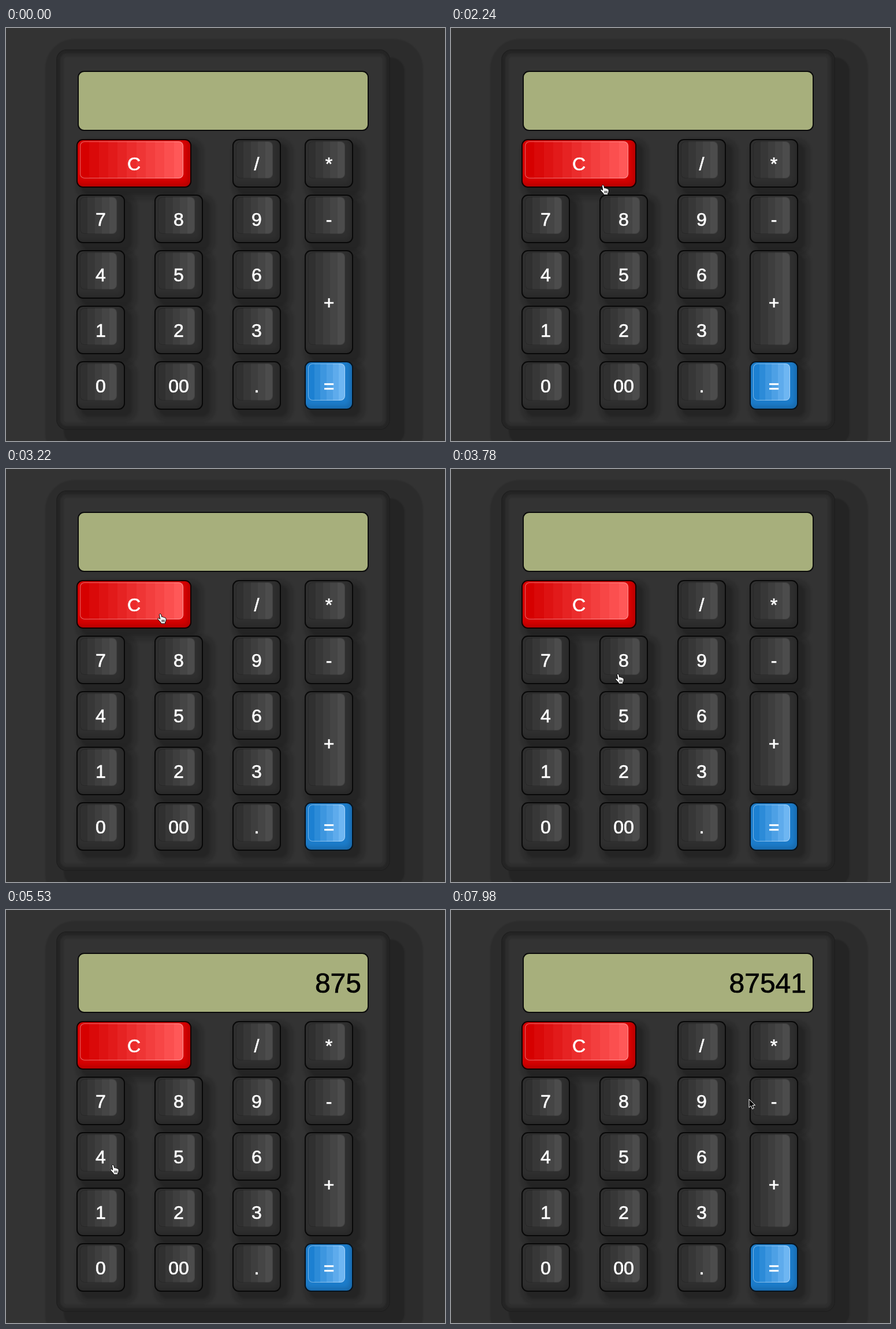
An HTML page for the animation above (8 s loop, 760 by 714 pixels).

```html
<!DOCTYPE html>
<html lang="en">
<head>
<meta charset="utf-8">
<title>Calculator</title>
<style>
  * { box-sizing: border-box; }
  html, body { margin: 0; width: 100%; height: 100%; overflow: hidden; background: #333; }
  #stage {
    position: relative; width: 760px; height: 714px; overflow: hidden;
    font-family: "Liberation Sans", Arial, sans-serif;
  }
  #stage div, svg { position: absolute; }
  #body {
    left: 87px; top: 37px; width: 578px; height: 658px; border-radius: 18px;
    background: #333; border: 2px solid #202020;
    box-shadow:
      19px 20px 2px 6px rgba(0,0,0,.17), 19px 20px 2px 38px rgba(0,0,0,.13),
      inset 0 0 2px 5px rgba(0,0,0,.18), inset 0 0 2px 11px rgba(0,0,0,.1);
  }
  #screen {
    left: 124px; top: 74px; width: 504px; height: 104px; padding-right: 11px;
    border: 2px solid #0b0b0b; border-radius: 11px; background: #a7af7c;
    color: #000; font-size: 48px; line-height: 102px; text-align: right;
    -webkit-text-stroke: .7px #000;
  }
  .key {
    border: 2px solid #080808; border-radius: 11px; background: #2f2f2f;
    box-shadow:
      10px 10px 4px 2px rgba(0,0,0,.18), 10px 10px 4px 12px rgba(0,0,0,.12),
      inset -4px -5px 7px rgba(0,0,0,.14);
  }
  .face {
    left: 4px; top: 2px; right: 12px; bottom: 14px; border-radius: 8px;
    border: 1px solid rgba(0,0,0,.16); background-origin: border-box;
  }
  .label {
    inset: 0; display: flex; align-items: center; justify-content: center;
    padding-top: 2px; color: #fff; font-size: 32px; -webkit-text-stroke: .7px #fff;
  }
  .red { background: #d50000; border-color: #140000; }
  .blue { background: #1c7cca; border-color: #07131e; }
  .red .face, .blue .face { border-color: rgba(255,255,255,.4); }
  svg { left: 0; top: 0; overflow: visible; }
</style>
</head>
<body>
<div id="stage">
  <div id="body"></div>
  <div id="screen"></div>
  <svg id="pointer" width="1" height="1">
    <g id="hand" fill="#fff" stroke="#000" stroke-linejoin="round">
      <path d="M-1.6 .6C-1 -1.1 1.2-.8 1.6 .8L2.8 5C4 4.2 5.2 4.7 5.6 5.6C6.6 5 7.8 5.5 8 6.5C9.2 6.2 10 7 10 8.2C10.2 10.5 10 12 8.7 13.8V16.2H1.5L.8 14.2C-.8 12.5-2.6 10.4-4 8.8C-4.8 7.2-3 6.2-1.4 7.6L-.2 8.6Z"/>
      <path d="M3 9.5V13.5M5 9.5V13.5M7 9.5V13.5"/>
    </g>
    <path id="arrow" d="M0 0V14.5L3.4 11.4L5.7 17L8.3 15.9L6 10.5H10.5Z" fill="#000" stroke="#fff"/>
  </svg>
</div>
<script>
const LOOP = 8000, TICK = 70, TRAVEL = 280, PRESS_DELAY = 210;
const [stage, screenBox, pointer, hand, arrow] =
  ["stage", "screen", "pointer", "hand", "arrow"].map(id => document.getElementById(id));

const tones = {
  dark: { from: [48, 48, 48], to: [76, 76, 76], bands: 5 },
  red: { from: [214, 0, 0], to: [255, 88, 88], bands: 11 },
  blue: { from: [28, 128, 210], to: [110, 182, 242], bands: 6 }
};
const keys = {};
const mix = (a, b, k) => a + (b - a) * k;

function bandedGradient({ from, to, bands }) {
  const stops = Array.from({ length: bands }, (_, i) => {
    const rgb = from.map((v, c) => Math.round(mix(v, to[c], i / (bands - 1))));
    return `rgb(${rgb}) ${100 * i / bands}% ${100 * (i + 1) / bands}%`;
  });
  return `linear-gradient(90deg, ${stops})`;
}

function addDiv(parent, className) {
  const div = document.createElement("div");
  div.className = className;
  return parent.appendChild(div);
}

function addKey(symbol, x, y) {
  const w = symbol === "C" ? 199 : 84;
  const h = symbol === "+" ? 180 : 84;
  const tone = { C: "red", "=": "blue" }[symbol] || "dark";
  const key = addDiv(stage, "key " + tone);
  key.style.cssText = `left:${x}px;top:${y}px;width:${w}px;height:${h}px`;
  addDiv(key, "face").style.background = bandedGradient(tones[tone]) + " border-box";
  addDiv(key, "label").textContent = symbol;
  keys[symbol] = { x, y, w, h };
}

[["C", "", "/", "*"], [7, 8, 9, "-"], [4, 5, 6, "+"], [1, 2, 3, ""], [0, "00", ".", "="]]
  .forEach((row, r) => row.forEach((symbol, c) => {
    if (symbol !== "") addKey(symbol, 122 + 135 * c - (c === 3 ? 10 : 0), 192 + 96 * r);
  }));
stage.append(pointer);

// Each stop: key, arrival time, spot on the key as fractions of its size
const entry = { x: 262, y: 275, time: 1960 };
const stops = [
  ["C", 3220, .73, .7], ["8", 3780, .38, .8], ["7", 4340, .5, .7], ["5", 4900, .5, .6],
  ["4", 5600, .5, .7], ["1", 6160, .5, .1], ["-", 6930, -.01, .46]
].map(([symbol, arrive, fx, fy]) => {
  const { x, y, w, h } = keys[symbol];
  return { symbol, arrive, x: x + w * fx, y: y + h * fy };
});

function pointerAt(t) {
  let { x, y } = entry;
  stops.forEach((stop, i) => {
    const depart = i ? stop.arrive - TRAVEL : entry.time;
    const k = Math.min(1, Math.max(0, (t - depart) / (stop.arrive - depart)));
    const eased = k * k * (3 - 2 * k);
    x = mix(x, stop.x, eased);
    y = mix(y, stop.y, eased);
  });
  return [Math.round(x), Math.round(y)];
}

function draw(now) {
  const t = Math.floor(now % LOOP / TICK) * TICK;
  screenBox.textContent = stops
    .filter(s => s.symbol >= "0" && s.symbol <= "9" && s.arrive + PRESS_DELAY <= t)
    .map(s => s.symbol).join("");

  const [x, y] = pointerAt(t);
  const overKey = Object.values(keys)
    .some(k => x >= k.x && x < k.x + k.w && y >= k.y && y < k.y + k.h);
  pointer.style.display = t < entry.time ? "none" : "";
  pointer.style.transform = `translate(${x}px, ${y}px)`;
  hand.style.display = overKey ? "" : "none";
  arrow.style.display = overKey ? "none" : "";
  requestAnimationFrame(draw);
}
draw(performance.now());
</script>
</body>
</html>
```
